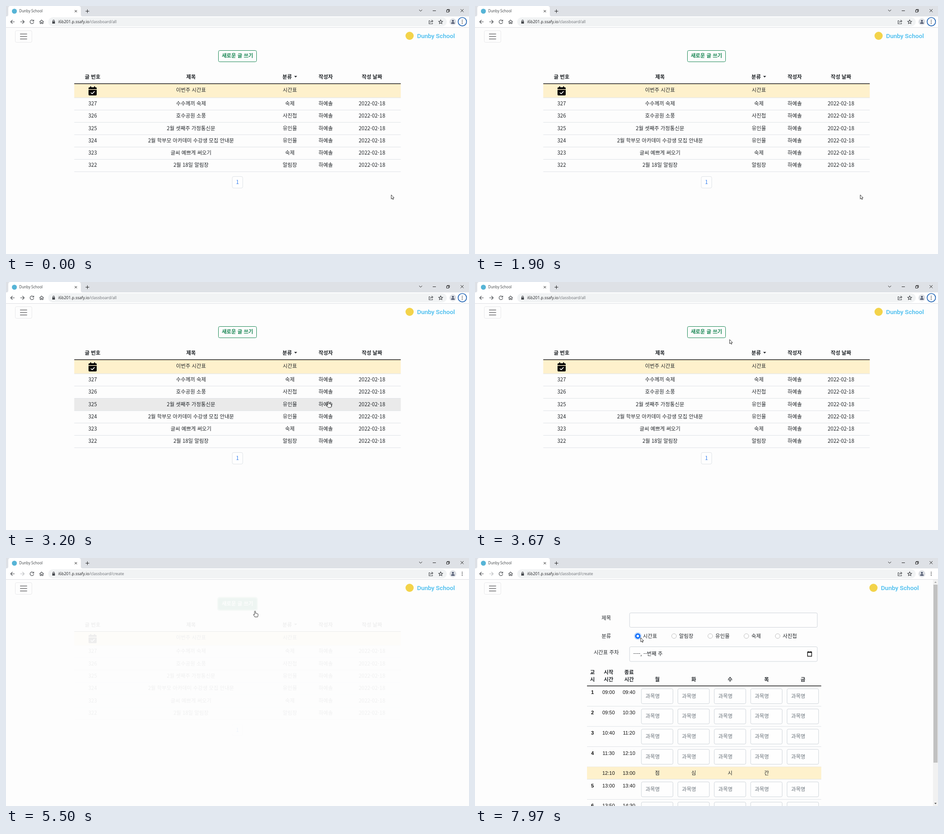
An HTML page that plays this animation: 1021x549 px, repeating every 8000 ms.

```html
<!DOCTYPE html>
<html lang="ko">
<head>
<meta charset="utf-8">
<title>Class board</title>
<style>
  html, body { margin: 0; width: 100%; height: 100%; overflow: hidden; background: #fdfdfd; }
  svg { display: block; width: 100%; height: 100%; }
  text { font: 11.38px "Noto Sans CJK KR", "Noto Sans CJK", "Noto Sans", sans-serif; fill: #212529; }
  .m { text-anchor: middle; }
  .b { font-weight: 700; }
  .t { font-family: "Liberation Sans", sans-serif; font-size: 11px; fill: #111; }
  .hint { fill: #6c757d; }
  .ui { font-family: "Open Sans", sans-serif; fill: #3c4043; }
  .brand { font: 500 13.6px Roboto, sans-serif; fill: #42bbee; }
  .box { fill: #fefefe; stroke: #ced4da; }
  .line { stroke: #dee2e6; }
  .rule { stroke: #1b1b1b; stroke-width: 1.4; }
  .ico { fill: none; stroke: #4a4d51; stroke-width: 1.2; }
  .win { fill: none; stroke: #222; stroke-width: 1; }
</style>
</head>
<body>
<svg viewBox="0 0 1021 549">
  <rect width="1021" height="549" fill="#fdfdfd"/>

  <g id="page">
    <rect x="20.5" y="54.5" width="36.500" height="26" rx="3" fill="none" stroke="#e8e8ea"/>
    <path d="M31 62H46.500M31 67.500H46.500M31 73H46.500" stroke="#6a6a6c" stroke-width="1.400"/>
    <g id="brand">
      <circle cx="890" cy="66" r="9" fill="#f3d34a"/>
      <text class="brand" x="906.500" y="71">Dunby School</text>
    </g>
    <g id="list"></g>
    <g id="form"></g>
    <g id="bar">
      <rect x="1010" y="48" width="11" height="501" fill="#f1f1f1"/>
      <rect x="1011" y="59" width="9" height="394" fill="#c1c1c1"/>
      <path d="M1013 55L1015.500 52L1018 55Z" fill="#a3a3a3"/>
      <path d="M1013 542L1015.500 545L1018 542Z" fill="#505050"/>
    </g>
  </g>

  <g id="chrome">
    <rect width="1021" height="24" fill="#dee1e6"/>
    <rect y="23" width="1021" height="24" fill="#fff"/>
    <path d="M0 47.500H1021" stroke="#dcdee1"/>
    <path d="M1 23Q5 23 5 19V5Q5 0 10 0H160Q165 0 165 5V19Q165 23 169 23Z" fill="#fff"/>
    <circle cx="18.500" cy="11.500" r="5.500" fill="#56b4d6"/>
    <text class="ui" x="29" y="14" style="font-size:8.1px">Dunby School</text>
    <path class="win" d="M151.500 9L156.500 14M156.500 9L151.500 14M175.500 11.500H183.500M179.500 7.500V15.500" stroke-width="1.300"/>
    <path class="win" d="M911 8.500L914.300 11.500L917.600 8.500M941 10.500H948M1002.500 7L1009 13.500M1009 7L1002.500 13.500"/>
    <path class="win" d="M971.500 9H976.500V13.500H971.500ZM973 9V7.500H978V12H976.500"/>

    <path class="ico" d="M19 35H10.500M14.300 31L10.300 35L14.300 39"/>
    <path class="ico" id="fwd" d="M31.500 35H40M36.200 31L40.200 35L36.200 39"/>
    <path class="ico" d="M60.300 32.300A4.100 4.100 0 1 0 61.200 35.700M61.200 30.500V33.500H58"/>
    <path class="ico" d="M74 35L78.500 31L83 35M75.300 34.500V39H77.500V36H79.500V39H81.700V34.500"/>
    <rect x="93" y="25" width="879" height="20" rx="10" fill="#f1f3f4"/>
    <rect x="102" y="34" width="6" height="5" rx=".6" fill="#4a4d51"/>
    <path class="ico" d="M103.300 34V32.800A1.700 1.700 0 0 1 106.700 32.800V34" stroke-width="1"/>
    <text class="ui" x="115" y="38.200" style="font-size:8.9px"><tspan fill="#202124">i6b201.p.ssafy.io</tspan><tspan id="path" fill="#6a6e73"></tspan></text>
    <path class="ico" d="M935.500 32.500H933V39.500H940.500V37.500M935.500 37Q936 33.500 940 33.500M938.500 31L941.500 33.500L938.500 36" stroke-width="1"/>
    <path class="ico" d="M958.500 30.700L959.800 33.600L962.900 33.900L960.500 36L961.200 39.100L958.500 37.500L955.800 39.100L956.500 36L954.100 33.900L957.200 33.600Z" stroke-width="1"/>
    <circle cx="985.500" cy="35" r="7.500" fill="#dadde2"/>
    <circle cx="985.500" cy="33" r="2" fill="#3c4660"/>
    <path d="M981.500 39Q981.500 36 985.500 36T989.500 39Z" fill="#3c4660"/>
    <g fill="#3c4043"><circle cx="1006" cy="31.500" r="1"/><circle cx="1006" cy="35" r="1"/><circle cx="1006" cy="38.500" r="1"/></g>
    <circle id="focus" cx="1006.300" cy="34.800" r="9.300" fill="none" stroke="#2064b4" stroke-width="1.700"/>
  </g>

  <g id="cursor" fill="#fff" stroke="#222" stroke-width=".9" stroke-linejoin="round">
    <path id="arrow" d="M0 0V9.200L2.100 7.300L3.500 10.400L5 9.800L3.600 6.800H6.500Z"/>
    <path id="hand" d="M-1.200 1.200C-1.200 -.4 1.200 -.4 1.200 1.200V5.200C1.600 4.400 3.200 4.600 3.200 5.600C3.600 4.900 5 5.200 5 6.200C5.600 5.600 6.600 6 6.600 7V9.500C6.600 11 5.800 11.600 5.600 13H-.6C-.8 11.600 -3.400 9.400 -3.600 7.800C-3.600 6.900 -2.200 6.800 -1.200 8.200Z"/>
    <path id="beam" fill="none" stroke="#333" d="M-2 -5.500H2M0 -5.500V5.500M-2 5.500H2"/>
  </g>
</svg>

<script>
const LOOP = 8000;
const NAV = 5070, LEAVE = 5150, ENTER = 5650, FADE = 500;
const CHECK = 7070, TABLE = 7670;
const $ = id => document.getElementById(id);

// Text is placed by its vertical middle.
const text = (x, y, s, cls = 'm') => `<text class="${cls}" x="${x}" y="${y + 4.1}">${s}</text>`;
const rect = (x, y, w, h, attrs) => `<rect x="${x}" y="${y}" width="${w}" height="${h}" ${attrs}/>`;
const box = (x, y, w, h) => rect(x, y, w, h, 'rx="2.8" class="box"');
const line = (x1, x2, y, cls = 'line') => `<path class="${cls}" d="M${x1} ${y}H${x2}"/>`;

const COLS = [191, 408, 626, 705, 807];
const AUTHOR = '하예솔';
const POSTS = [
  ['수수께끼 숙제', '숙제'],
  ['호수공원 소풍', '사진첩'],
  ['2월 셋째주 가정통신문', '유인물'],
  ['2월 학부모 아카데미 수강생 모집 안내문', '유인물'],
  ['글씨 예쁘게 써오기', '숙제'],
  ['2월 18일 알림장', '알림장']
];
const rowTop = i => i ? 203 + 27.3 * (i - 1) : 172;

function buildList() {
  let s = rect(468.5, 98.5, 84, 25, 'id="write" rx="3" stroke="#198754"') +
    rect(467, 97, 87, 28, 'id="ring" rx="4" fill="none" stroke="#198754" stroke-width="3"') +
    `<g id="writeText">${text(510.5, 110.3, '새로운 글 쓰기', 'm b')}</g>`;
  ['글 번호', '제목', '분류', '작성자', '작성 날짜'].forEach((h, i) => {
    s += text(i === 2 ? 620 : COLS[i], 157.3, h, 'm b');
  });
  s += '<path d="M635.500 154.800H642L638.700 158.200Z" fill="#212529"/>';
  s += rect(150.5, 172, 720, 31, 'fill="#fef1cc"') + rect(150.5, 0, 720, 27.3, 'id="hover" fill="#000" fill-opacity=".075"');
  s += line(150.5, 870.5, 172, 'rule') + line(150.5, 870.5, 203);
  s += '<path d="M182 184V182Q182 180 184 180H185.500V178H188V180H194V178H196.500V180H198Q200 180 200 182V184ZM182 185.500H200V196Q200 198 198 198H184Q182 198 182 196Z"/>' +
    '<path d="M187 191.500L190 194.300L195.300 188.800" fill="none" stroke="#fff" stroke-width="1.700"/>';
  s += text(COLS[1], 185.6, '이번주 시간표') + text(COLS[2], 185.6, '시간표');
  POSTS.forEach(([title, kind], i) => {
    const y = 215.8 + 27.3 * i;
    [327 - i, title, kind, AUTHOR, '2022-02-18'].forEach((v, c) => s += text(COLS[c], y, v));
    s += line(150.5, 870.5, rowTop(i + 2));
  });
  s += rect(499, 377.5, 23, 25.5, 'rx="3" fill="#fefefe" stroke="#dee2e6"') +
    `<g style="--c:#0d6efd">${text(510.5, 390, '1').replace('<text', '<text style="fill:#2f7bee"')}</g>`;
  $('list').innerHTML = s;
}

function buildForm() {
  let s = text(295, 132.6, '제목') + box(346.5, 121.5, 414, 32) + text(295, 172.4, '분류');
  [['시간표', 364.6], ['알림장', 444.5], ['유인물', 524.4], ['숙제', 604], ['사진첩', 673]].forEach(([n, x]) => {
    s += `<circle cx="${x}" cy="172.800" r="5.200" fill="#fff" stroke="#bcbcbc"/>` + text(x + 11.2, 172.4, n, '');
  });
  s += '<g id="checked"><circle cx="364.600" cy="172.800" r="8.300" fill="#0d6efd" opacity=".25"/>' +
    '<circle cx="364.600" cy="172.800" r="5.900" fill="#0d6efd"/><circle cx="364.600" cy="172.800" r="2.700" fill="#fff"/></g>';
  s += '<g id="plain">' + text(295, 208.4, '내용') + box(346.5, 196.5, 414, 168) +
    '<path d="M753.500 363L758.500 358M756.500 363L758.500 361" stroke="#555"/>' +
    text(295, 388.3, '첨부') + box(346.5, 376, 414, 33) +
    rect(347, 376.5, 62, 25, 'fill="#e9ecef"') +
    '<path d="M409 376.500V401.500" stroke="#ced4da"/>' +
    text(377.8, 388.3, '파일 선택') + text(417, 388.3, '선택된 파일 없음', '') +
    rect(480.5, 420.5, 59.5, 24.5, 'rx="3" fill="#1ee866" stroke="#17b350"') +
    text(510.5, 432.6, '작성하기', 'm b').replace('<text', '<text style="fill:#fff"') + '</g>';
  s += `<g id="week">${buildWeek()}</g>`;
  $('form').innerHTML = s;
}

function buildWeek() {
  // Drawn inside the form, which sits 5.6 px to the left once the scrollbar is there.
  let s = text(295, 208.4, '시간표 주차') + box(346.5, 196.5, 414, 32.5) + text(354.6, 212.3, '----, --번째 주', '') +
    '<path d="M739 208H748V217.500H739ZM739 209H748M741 208V206.500M746 208V206.500" fill="none" stroke="#111" stroke-width="1.400"/>';
  s += '<g transform="translate(5.600 0)">';
  [['교', '시', 259], ['시작', '시간', 294.5], ['종료', '시간', 339.7]].forEach(([a, b, x]) => {
    s += text(x, 253, a, 'm b') + text(x, 269, b, 'm b');
  });
  const dayX = d => 402 + 80.3 * d;
  [...'월화수목금'].forEach((n, d) => s += text(dayX(d), 269, n, 'm b'));
  s += line(247, 763.5, 283.3, 'rule');
  const clock = m => `${String(m / 60 | 0).padStart(2, '0')}:${String(m % 60).padStart(2, '0')}`;
  for (let i = 0; i < 6; i++) {
    const late = i > 3;
    const y = 283.5 + 44.7 * i + (late ? 27.4 : 0);
    const start = 540 + 50 * i + (late ? 40 : 0);
    s += text(259, y + 13.8, i + 1, 'm b t') + text(294.5, y + 13.8, clock(start), 'm t') +
      text(339.5, y + 13.8, clock(start + 40), 'm t');
    for (let d = 0; d < 5; d++) {
      s += box(dayX(d) - 35, y + 6, 69.5, 33) + text(dayX(d) - 26, y + 22, '과목명', 'hint');
    }
    s += line(247, 763.5, y + 44.7);
  }
  s += rect(247, 462.3, 516.5, 27.6, 'fill="#fef1cc"') + line(247, 763.5, 489.9) +
    text(294.5, 476, '12:10', 'm t') + text(339.5, 476, '13:00', 'm t');
  [...'점심시간'].forEach((n, d) => s += text(dayX(d), 476, n));
  return s + '</g>';
}

const clamp = v => Math.max(0, Math.min(1, v));

// cubic-bezier(.25, .1, .25, 1)
function ease(x) {
  x = clamp(x);
  let lo = 0, hi = 1;
  const bez = (u, a, b) => 3 * u * (1 - u) * (1 - u) * a + 3 * u * u * (1 - u) * b + u * u * u;
  for (let i = 0; i < 20; i++) {
    const mid = (lo + hi) / 2;
    if (bez(mid, .25, .25) < x) lo = mid; else hi = mid;
  }
  return bez(lo, .1, 1);
}

// time, x, y of the pointer tip
const TRACK = [
  [0, 849.5, 418], [2680, 849.5, 418], [3000, 790.5, 336.8], [3500, 585, 156], [3670, 561.6, 127.5],
  [3830, 554, 124], [4030, 554, 124], [4230, 549.2, 117.5], [5900, 549.2, 117.5], [6200, 544.6, 118],
  [6290, 544.6, 118], [6490, 516, 260], [6700, 484.5, 406], [6880, 425, 296], [7070, 365.5, 176.5], [8000, 365.5, 176.5]
];

// Smooth curve through the track that stands still where two points agree.
function pointer(t) {
  let i = 0;
  while (i < TRACK.length - 2 && t >= TRACK[i + 1][0]) i++;
  const slope = (k, c) => {
    const a = TRACK[k - 1], p = TRACK[k], b = TRACK[k + 1];
    if (!a || !b) return 0;
    const same = q => q[1] === p[1] && q[2] === p[2];
    return same(a) || same(b) ? 0 : (b[c] - a[c]) / (b[0] - a[0]);
  };
  const p = TRACK[i], q = TRACK[i + 1], d = q[0] - p[0], u = (t - p[0]) / d;
  return [1, 2].map(c => {
    const h = u * u * (3 - 2 * u);
    return p[c] + (q[c] - p[c]) * h + d * u * (1 - u) * (slope(i, c) * (1 - u) - slope(i + 1, c) * u);
  });
}

const show = (id, on) => $(id).style.display = on ? '' : 'none';

function draw(t) {
  const onForm = t >= ENTER, created = t >= NAV, week = t >= TABLE;
  const [x, y] = pointer(t);

  const path = created ? '/classboard/create' : '/classboard/all';
  if ($('path').textContent !== path) $('path').textContent = path;
  $('fwd').style.stroke = created ? '#bcbec1' : '';
  show('focus', !created);

  const out = ease((t - LEAVE) / FADE), into = ease((t - ENTER) / FADE);
  show('list', !onForm);
  show('form', onForm);
  $('list').style.opacity = 1 - out;
  $('list').setAttribute('transform', `translate(0 ${-10 * out})`);
  $('form').style.opacity = into;
  $('form').setAttribute('transform', `translate(${week ? -5.6 : 0} ${10 * (1 - into)})`);
  $('brand').setAttribute('transform', `translate(${week ? -11.3 : 0} 0)`);
  show('bar', week);
  show('week', week);
  show('plain', !week);
  show('checked', t >= CHECK);

  const fill = clamp((t - 4080) / 150);
  $('write').style.fill = `rgba(25,135,84,${fill})`;
  const mix = (a, b) => Math.round(a + (b - a) * fill);
  $('writeText').firstChild.style.fill = `rgb(${mix(25, 255)},${mix(135, 255)},${mix(84, 255)})`;
  $('ring').style.opacity = .5 * clamp((t - NAV) / 100);

  let row = -1;
  if (!onForm && x > 150 && x < 871) {
    for (let i = 0; i < 7; i++) if (y + 3 >= rowTop(i) && y + 3 < rowTop(i + 1)) row = i;
  }
  show('hover', row >= 0);
  if (row >= 0) {
    $('hover').setAttribute('y', rowTop(row));
    $('hover').setAttribute('height', rowTop(row + 1) - rowTop(row));
  }

  const overField = onForm && !week && x > 346 && x < 761 && (y > 121 && y < 154 || y > 196 && y < 365);
  const overLink = row >= 0 || !onForm && t > 4100;
  show('beam', overField);
  show('hand', overLink);
  show('arrow', !overField && !overLink);
  $('cursor').setAttribute('transform', `translate(${x} ${y})`);
}

buildList();
buildForm();
const begin = performance.now();
function tick() {
  draw((performance.now() - begin) % LOOP);
  requestAnimationFrame(tick);
}
tick();
</script>
</body>
</html>
```
